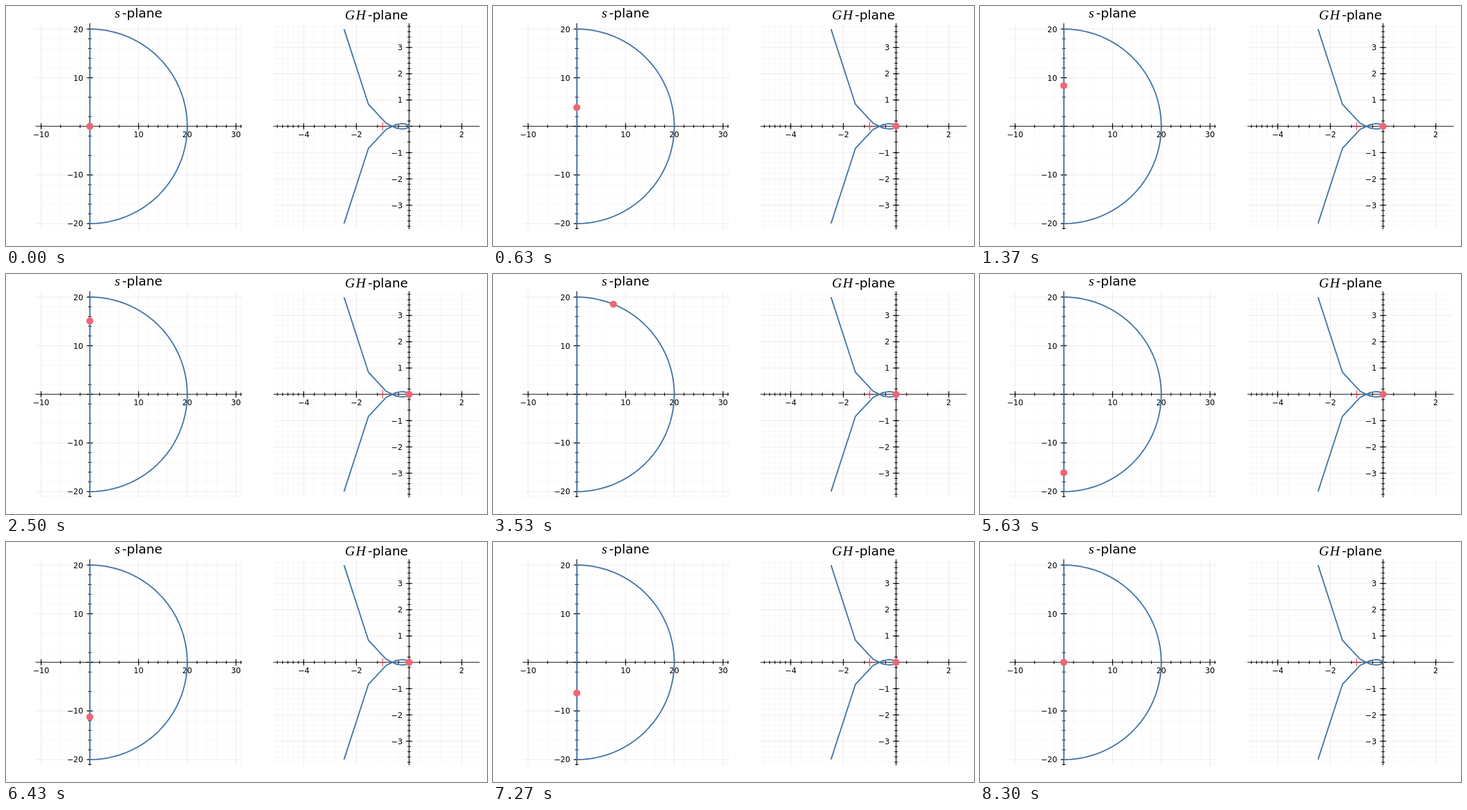
Write an HTML page that moves like this. It is 750 by 375 pixels and loops after 8.33 s.

```html
<!DOCTYPE html>
<html lang="en">
<head>
<meta charset="utf-8">
<title>Nyquist contour</title>
<style>
  html, body { margin: 0; width: 100%; height: 100%; overflow: hidden; background: #fff; }
  svg { display: block; width: 750px; height: 375px; }
  text { font: 12px "DejaVu Sans", sans-serif; }
  .title { font-size: 20px; }
  .math { font: italic 21.5px "Liberation Serif", serif; }
  .minor-grid { stroke: #000; stroke-opacity: .03; }
  .major-grid { stroke: #000; stroke-opacity: .06; }
  .axis { stroke: #000; stroke-width: 1.1; }
  .curve { fill: none; stroke: #4477aa; stroke-width: 2; stroke-linejoin: round; }
  .cross { fill: none; stroke: #d03040; stroke-width: 1; }
  .dot { fill: #ee6677; }
</style>
</head>
<body>
<svg id="stage" viewBox="0 0 750 375"></svg>
<script>
const LOOP = 8330, STEPS = 50, DOT_R = 5.5;
const stage = document.getElementById("stage");

const sPlane = {
  cx: 130.7, cy: 188, unit: 7.597,
  left: 46, right: 368, top: 27, bottom: 349,
  xTicks: [-10, 10, 20, 30], yTicks: [-20, -10, 10, 20], labelX: 120.3
};
const ghPlane = {
  cx: 628.5, cy: 188, unit: 41.08,
  left: 417, right: 738.5, top: 27, bottom: 349,
  xTicks: [-4, -2, 2], yTicks: [-3, -2, -1, 1, 2, 3], labelX: 618.3
};

function add(tag, attrs, text) {
  const el = document.createElementNS("http://www.w3.org/2000/svg", tag);
  for (const key in attrs) el.setAttribute(key, attrs[key]);
  if (text) el.textContent = text;
  stage.append(el);
  return el;
}

const line = (cls, x1, y1, x2, y2) => add("line", { class: cls, x1, y1, x2, y2 });
const toX = (p, v) => p.cx + v * p.unit;
const toY = (p, v) => p.cy - v * p.unit;

// Five parts between labelled ticks; the outer intervals follow the ratio of the first two.
function minorTicks(ticks) {
  const n = ticks.length;
  const first = ticks[1] - ticks[0], last = ticks[n - 1] - ticks[n - 2];
  const ratio = (ticks[2] - ticks[1]) / first;
  const all = [ticks[0] - first / ratio, ...ticks, ticks[n - 1] + last * ratio];
  const out = [];
  for (let i = 0; i + 1 < all.length; i++)
    for (let k = 0; k < 5; k++) out.push(all[i] + (all[i + 1] - all[i]) * k / 5);
  return out;
}

function drawPlane(p) {
  const inX = x => x >= p.left && x <= p.right;
  const inY = y => y >= p.top && y <= p.bottom;
  const place = (ticks, to, inside) => ticks.map(v => to(p, v)).filter(inside);
  const xMinor = place(minorTicks(p.xTicks), toX, inX);
  const yMinor = place(minorTicks(p.yTicks), toY, inY);
  const xMajor = place([...p.xTicks, 0], toX, inX);
  const yMajor = place([...p.yTicks, 0], toY, inY);

  const grid = (cls, xs, ys) => {
    xs.forEach(x => line(cls, x, p.top, x, p.bottom));
    ys.forEach(y => line(cls, p.left, y, p.right, y));
  };
  const marks = (xs, ys, r) => {
    xs.forEach(x => line("axis", x, p.cy - r, x, p.cy + r));
    ys.forEach(y => line("axis", p.cx - r, y, p.cx + r, y));
  };
  grid("minor-grid", xMinor, yMinor);
  grid("major-grid", xMajor, yMajor);
  line("axis", p.left, p.cy, p.right, p.cy);
  line("axis", p.cx, p.top, p.cx, p.bottom);
  marks(xMinor, yMinor, 2.6);
  marks(xMajor, yMajor, 5);

  const label = v => String(v).replace("-", "\u2212");
  p.xTicks.forEach(v =>
    add("text", { x: toX(p, v), y: 205.2, "text-anchor": "middle" }, label(v)));
  p.yTicks.forEach(v =>
    add("text", { x: p.labelX, y: toY(p, v) + 4.5, "text-anchor": "end" }, label(v)));
}

// Contour: up the axis in two runs, round the arc, then up again in two runs.
function contour(i) {
  const part = Math.floor(i / STEPS), u = i % STEPS / (STEPS - 1);
  if (part === 2) {
    const a = Math.PI * (0.5 - u);
    return [20 * Math.cos(a), 20 * Math.sin(a)];
  }
  return [0, [0, 10, 0, -20, -10][part] + 10 * u];
}

const mul = (a, b) => [a[0] * b[0] - a[1] * b[1], a[0] * b[1] + a[1] * b[0]];

// GH(s) = 1 / (s (s + 1) (2s + 1)), undefined at the origin
function transfer([x, y]) {
  const d = mul(mul([x, y], [x + 1, y]), [2 * x + 1, 2 * y]);
  const m = d[0] * d[0] + d[1] * d[1];
  return m < 1e-12 ? null : [d[0] / m, -d[1] / m];
}

function drawCurve(p, pts) {
  const points = pts.filter(Boolean)
    .map(([x, y]) => toX(p, x).toFixed(2) + "," + toY(p, y).toFixed(2)).join(" ");
  add("polyline", { class: "curve", points });
}

const path = Array.from({ length: 5 * STEPS }, (_, i) => contour(i));
const image = path.map(transfer);

drawPlane(sPlane);
drawPlane(ghPlane);
add("text", { class: "math", x: 169.5, y: 18.3 }, "s");
add("text", { class: "title", x: 181, y: 18.3 }, "-plane");
add("text", { class: "math", x: 528.5, y: 20.8 }, "G");
add("text", { class: "math", x: 545.5, y: 20.8 }, "H");
add("text", { class: "title", x: 564.2, y: 20.8 }, "-plane");

drawCurve(sPlane, path);
drawCurve(ghPlane, image);
const poleX = toX(ghPlane, -1);
add("path", { class: "cross", d: `M${poleX - 6.5} 188h13M${poleX} 181.5v13` });
const sDot = add("circle", { class: "dot", r: DOT_R });
const ghDot = add("circle", { class: "dot", r: DOT_R });

function moveDot(dot, p, pt) {
  dot.style.display = pt ? "" : "none";
  if (!pt) return;
  dot.setAttribute("cx", toX(p, pt[0]));
  dot.setAttribute("cy", toY(p, pt[1]));
}

const start = performance.now();
function tick() {
  const t = (performance.now() - start) % LOOP;
  // 30 steps per second, on a 10 ms clock
  const i = Math.min(path.length - 1, Math.floor((Math.floor(t / 10) * 10 + 3.4) * 0.03));
  moveDot(sDot, sPlane, path[i]);
  moveDot(ghDot, ghPlane, image[i]);
  requestAnimationFrame(tick);
}
tick();
</script>
</body>
</html>
```
